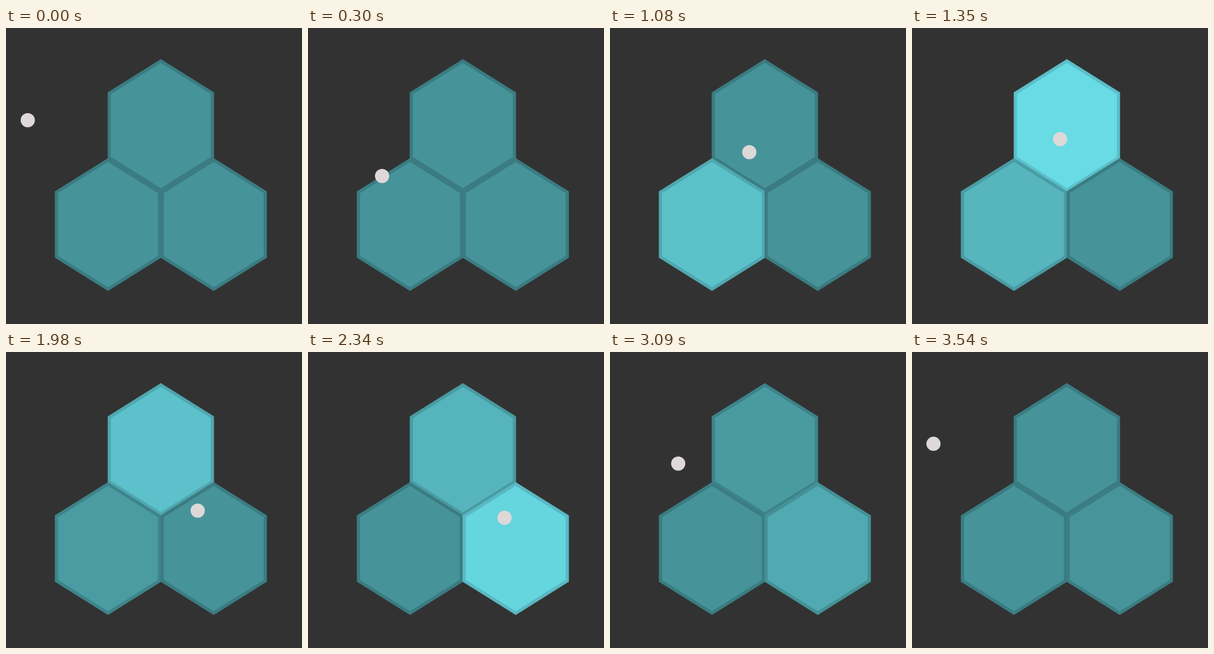
Animation, 500 px wide and 500 px high, one loop 3570 ms. Source, as an HTML page with a canvas:

```html
<!DOCTYPE html>
<html lang="en">
<head>
<meta charset="utf-8">
<title>Hexagon loader</title>
<style>
  html, body { margin: 0; width: 100%; height: 100%; overflow: hidden; background: #323232; }
  canvas { display: block; }
</style>
</head>
<body>
<canvas width="500" height="500"></canvas>
<script>
const ctx = document.querySelector('canvas').getContext('2d');
const LOOP = 3570, STEP = 30;
const CENTER = { x: 261.6, y: 276.3 }, HALF_W = 87.1, HALF_H = 109.1;

// The ball travels home -> left -> top -> right -> home
const home = { x: 36, y: 155 };
const left = { time: 533, x: 174, y: 302, fade: 1750 };
const top_ = { time: 1320, x: 250, y: 187.5, fade: 2100 };
const right = { time: 2220, x: 336.6, y: 282, fade: 1400 };
const stops = [{ ...home, time: -STEP }, left, top_, right, { ...home, time: LOOP }];

const lerp = (a, b, k) => a + (b - a) * k;
const mix = (dim, lit, k) => `rgb(${dim.map((c, i) => Math.round(lerp(c, lit[i], k)))})`;

// cubic-bezier(.42, 0, .58, 1), solved by bisection
function easeInOut(u) {
  let lo = 0, hi = 1, s = .5;
  for (let i = 0; i < 24; i++) {
    const x = 1.26 * s * (1 - s) ** 2 + 1.74 * s * s * (1 - s) + s ** 3;
    if (x < u) lo = s; else hi = s;
    s = (lo + hi) / 2;
  }
  return s * s * (3 - 2 * s);
}

// A hexagon flashes when the ball stops on it, then fades
function glow({ time, fade }, t) {
  return t < time ? 0 : Math.max(0, 1 - (t - time) / fade) ** 1.2;
}

function drawHex(dx, dy, k) {
  const x = CENTER.x + dx * 89.3, y = CENTER.y + dy * 111.5;
  ctx.beginPath();
  for (let i = 0; i < 6; i++) {
    const a = i * Math.PI / 3;
    ctx.lineTo(x + HALF_W * Math.sin(a) / Math.sin(Math.PI / 3), y - HALF_H * Math.cos(a));
  }
  ctx.closePath();
  ctx.fillStyle = mix([70, 147, 153], [105, 220, 230], k);
  ctx.strokeStyle = mix([58, 124, 130], [92, 192, 202], k);
  ctx.lineWidth = 5.4;
  ctx.fill();
  ctx.stroke();
}

function drawBall(t) {
  const i = stops.findIndex(stop => stop.time > t);
  const from = stops[i - 1], to = stops[i];
  const k = easeInOut((t - from.time) / (to.time - from.time));
  ctx.beginPath();
  ctx.arc(lerp(from.x, to.x, k), lerp(from.y, to.y, k), 12, 0, Math.PI * 2);
  ctx.fillStyle = '#ded8d8';
  ctx.fill();
}

function draw() {
  const t = Math.floor(performance.now() % LOOP / STEP) * STEP;
  ctx.fillStyle = '#323232';
  ctx.fillRect(0, 0, 500, 500);
  drawHex(0, -1, glow(top_, t));
  drawHex(-1, .5, glow(left, t));
  drawHex(1, .5, glow(right, t));
  drawBall(t);
  requestAnimationFrame(draw);
}
draw();
</script>
</body>
</html>
```
